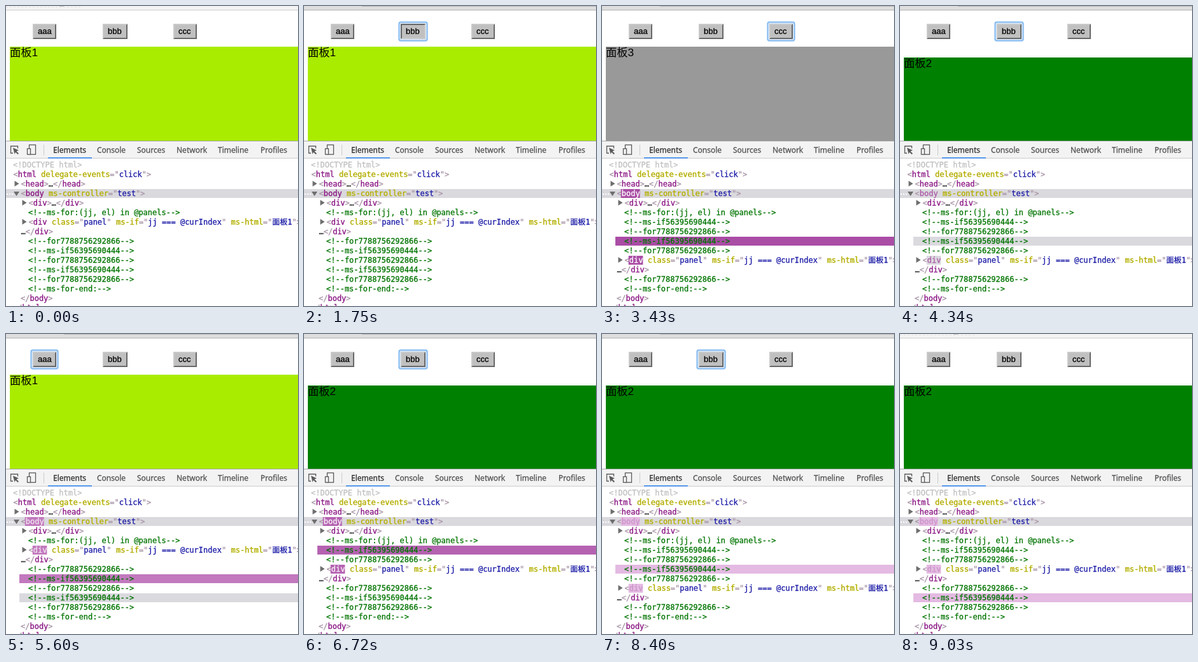
Write an HTML page with a canvas that moves like this. It is 459x472 px and loops after 9.1 s.

```html
<!DOCTYPE html>
<html lang="en">
<head>
<meta charset="utf-8">
<title>Panel switcher with element inspector</title>
<style>
  html, body { margin: 0; width: 100%; height: 100%; overflow: hidden; background: #fff; }
  canvas { display: block; }
</style>
</head>
<body>
<canvas id="stage" width="459" height="472"></canvas>
<script>
const ctx = document.getElementById('stage').getContext('2d');
const WIDTH = 459, LOOP = 9100, TICK = 70;

const MONO = '12px "DejaVu Sans Mono", monospace';
const UI = '12px "Noto Sans", "Open Sans", sans-serif';
const BUTTON_FONT = '13px "Liberation Sans", Arial, sans-serif';
const PANEL_FONT = '17.3px "Liberation Sans", "Noto Sans CJK SC", "Noto Sans CJK", sans-serif';
const GRAY = '#dad9de', PUNCT = '#a894a6', TAG = '#881280', VALUE = '#1a1aa6', COMMENT = '#007400';

const BUTTONS = [{ x: 42, w: 37, label: 'aaa' }, { x: 152, w: 39, label: 'bbb' }, { x: 263, w: 37, label: 'ccc' }];
const PANELS = [{ top: 64, color: '#aaec00' }, { top: 81, color: '#008000' }, { top: 64, color: '#999999' }];

// Each click: button pressed, then panel swapped, then the inspector catches up.
const PRESS = 140, LAG = 70;
const CLICKS = [
  { at: 1890, index: 1 }, { at: 3220, index: 2 }, { at: 4340, index: 1 }, { at: 5250, index: 0 },
  { at: 6440, index: 1 }, { at: 7770, index: 2 }, { at: 8400, index: 1 }
];
const WINDOW_FOCUS = 1050, WINDOW_BLUR = 8960;

function rect(x, y, w, h, color) {
  ctx.fillStyle = color;
  ctx.fillRect(x, y, w, h);
}

// A thin stroke of the same colour gives the heavier look of desktop font smoothing.
function text(str, x, y, color, font, weight = 0.3) {
  ctx.font = font;
  ctx.fillStyle = ctx.strokeStyle = color;
  ctx.fillText(str, x, y);
  if (weight) {
    ctx.lineWidth = weight;
    ctx.strokeText(str, x, y);
  }
  return x + ctx.measureText(str).width;
}

function polygon(points, color) {
  ctx.beginPath();
  points.forEach(([x, y]) => ctx.lineTo(x, y));
  ctx.closePath();
  ctx.fillStyle = color;
  ctx.fill();
}

function mix(from, to, k) {
  return `rgb(${from.map((v, i) => Math.round(v + (to[i] - v) * k)).join(',')})`;
}

// CSS "ease" curve
function ease(x) {
  const bezier = (t, a, b) => 3 * t * (1 - t) * ((1 - t) * a + t * b) + t ** 3;
  let lo = 0, hi = 1;
  for (let i = 0; i < 16; i++) {
    const mid = (lo + hi) / 2;
    if (bezier(mid, 0.25, 0.25) < x) lo = mid; else hi = mid;
  }
  return bezier(lo, 0.1, 1);
}

function flash(age) {
  if (!(age >= 0 && age < 1330)) return null;
  const k = ease(Math.min(age / 1120, 1));
  return {
    back: k > 0.87 ? GRAY : mix([158, 54, 153], [245, 219, 244], k),
    ink: mix([255, 255, 255], [136, 18, 128], k * k * 0.7)
  };
}

function stateAt(time) {
  const state = { focus: -1, pressed: -1, panel: 0, slot: 0, updated: -Infinity, closed: [] };
  for (const { at, index } of CLICKS) {
    if (time >= at - PRESS) {
      state.focus = index;
      state.pressed = time < at ? index : -1;
    }
    if (time >= at) state.panel = index;
    if (time >= at + LAG) {
      state.closed[state.slot] = at + LAG;
      state.slot = index;
      state.updated = at + LAG;
    }
  }
  state.active = time >= WINDOW_FOCUS && time < WINDOW_BLUR;
  if (!state.active) state.focus = -1;
  return state;
}

function drawWindowEdge(active) {
  rect(0, 0, WIDTH, 6, active ? '#dedede' : '#f3f3f3');
  if (active) {
    rect(91, 0, WIDTH - 91, 1, '#b8b8b8');
  } else {
    for (let x = 0; x < 120; x += 6) rect(x, 1, 3, 1, '#e2e2e2');
    rect(84, 0, 7, 1, '#c4c4c4');
  }
  rect(0, 6, WIDTH, 1, active ? '#b4b4b4' : '#cfcfcf');
}

function ring(x, y, w, h, outset, width, color) {
  ctx.beginPath();
  ctx.roundRect(x - outset, y - outset, w + 2 * outset, h + 2 * outset, outset);
  ctx.lineWidth = width;
  ctx.strokeStyle = color;
  ctx.stroke();
}

function drawButton({ x, w, label }, focused, pressed) {
  const y = 28, h = 24;
  if (focused) {
    ring(x, y, w, h, 3.5, 1.5, '#cfe4fa');
    ring(x, y, w, h, 2.3, 1.7, '#76b2ee');
    ring(x, y, w, h, 0.8, 1.4, '#d3e5f8');
  }
  const light = '#c9c9c9', dark = '#686868';
  rect(x, y, w, h, pressed ? dark : light);
  polygon([[x + w, y], [x + w, y + h], [x, y + h], [x + 2, y + h - 2], [x + w - 2, y + h - 2], [x + w - 2, y + 2]],
    pressed ? light : dark);
  rect(x + 2, y + 2, w - 4, h - 4, '#c0c0c0');
  text(label, x + 8, 44, '#000', BUTTON_FONT);
}

function drawPanel(index) {
  const { top, color } = PANELS[index];
  rect(6, top, WIDTH - 6, 212 - top, color);
  text('面板' + (index + 1), 6, top + 14.5, '#000', PANEL_FONT, 0);
}

function drawToolbar() {
  rect(0, 212, WIDTH, 260, '#fff');
  rect(0, 212, WIDTH, 28, '#f3f3f3');
  rect(0, 212, WIDTH, 1, '#a8a8a8');
  rect(0, 239, WIDTH, 1, '#cccccc');
  rect(59, 218, 1, 17, '#cccccc');
  rect(66, 238, 69, 2, '#5596ea');

  ctx.strokeStyle = '#5a5a5a';
  ctx.lineWidth = 1.3;
  ctx.beginPath();
  ctx.moveTo(11, 231.5);
  ctx.lineTo(7.5, 231.5);
  ctx.lineTo(7.5, 220.5);
  ctx.lineTo(18.5, 220.5);
  ctx.lineTo(18.5, 224);
  ctx.stroke();
  polygon([[11, 223], [20, 227], [16.5, 228.5], [20, 232], [18.5, 233.5], [15, 230], [13.5, 233]], '#5a5a5a');
  ctx.strokeRect(36.5, 218.5, 10, 15);
  rect(33, 224, 6, 10, '#f3f3f3');
  ctx.strokeRect(33.5, 224.5, 5, 9);

  const tabs = [['Elements', 74], ['Console', 143], ['Sources', 206], ['Network', 268], ['Timeline', 333], ['Profiles', 400]];
  tabs.forEach(([label, x], i) => text(label, x, 231, i ? '#555' : '#333', UI));
}

const rowY = row => 250 + 15 * row;

function code(row, x, parts) {
  for (const [str, color] of parts) x = text(str, x, rowY(row) + 4, color, MONO);
}

function attribute(name, value) {
  return [[' ', PUNCT], [name, 'attr'], ['="', PUNCT], [value, VALUE], ['"', PUNCT]];
}

function openTag(row, x, name, attributes, glow) {
  const y = rowY(row) + 4;
  x = text('<', x, y, PUNCT, MONO);
  if (glow) rect(x - 1, y - 11, name.length * 7.22 + 1, 14, glow.back);
  x = text(name, x, y, glow ? glow.ink : TAG, MONO);
  for (const [str, color] of [...attributes, ['>', PUNCT]]) {
    if (color === 'attr') {
      text(str, x + 0.4, y, '#bce000', MONO);
      x = text(str, x - 0.1, y, 'rgba(170,90,25,0.5)', MONO, 0) + 0.1;
    } else {
      x = text(str, x, y, color, MONO);
    }
  }
  return x;
}

function closeTag(row, x, name, lead = '') {
  code(row, x, [[lead, '#333'], ['</', PUNCT], [name, TAG], ['>', PUNCT]]);
}

function foldedTag(row, x, name) {
  const end = openTag(row, x, name, []);
  closeTag(row, end, name, '…');
  arrow(row, x - 11);
}

function arrow(row, x, open) {
  const y = rowY(row);
  polygon(open ? [[x - 1, y - 3], [x + 8, y - 3], [x + 3.5, y + 4]] : [[x + 1, y - 5], [x + 8, y - 0.5], [x + 1, y + 4]], '#6e6e6e');
}

function comment(row, str, glow) {
  if (glow) rect(21, rowY(row) - 7, WIDTH - 21, 14, glow.back);
  code(row, 35, [[`<!--${str}-->`, COMMENT]]);
}

function drawTree(state, time) {
  const glow = flash(time - state.updated);
  code(0, 11, [['<!DOCTYPE html>', '#c0c0c0']]);
  openTag(1, 11.5, 'html', attribute('delegate-events', 'click'));
  foldedTag(2, 23.5, 'head');

  rect(0, 288, WIDTH, 14, GRAY);
  for (let x = 1; x < 10; x += 4) rect(x, 295, 2, 2, '#fff');
  arrow(3, 13, true);
  openTag(3, 23.5, 'body', attribute('ms-controller', 'test'), glow);

  foldedTag(4, 35.5, 'div');
  comment(5, 'ms-for:(jj, el) in @panels');

  let row = 6;
  for (let slot = 0; slot < 3; slot++) {
    if (slot === state.slot) {
      arrow(row, 24.5);
      openTag(row++, 35.5, 'div', [
        ...attribute('class', 'panel'),
        ...attribute('ms-if', 'jj === @curIndex'),
        ...attribute('ms-html', '面板1')
      ], glow);
      closeTag(row++, 23.5, 'div', '…');
    } else {
      comment(row++, 'ms-if56395690444', flash(time - state.closed[slot]));
    }
    comment(row++, 'for7788756292866');
  }
  comment(row++, 'ms-for-end:');
  closeTag(row++, 23, 'body');
  closeTag(row, 11, 'html');
}

function draw(now) {
  const time = Math.floor((now % LOOP) / TICK) * TICK;
  const state = stateAt(time);
  rect(0, 0, WIDTH, 472, '#fff');
  drawWindowEdge(state.active);
  BUTTONS.forEach((button, i) => drawButton(button, i === state.focus, i === state.pressed));
  drawPanel(state.panel);
  drawToolbar();
  drawTree(state, time);
}

const start = performance.now();
function loop() {
  draw(performance.now() - start);
  requestAnimationFrame(loop);
}
loop();
</script>
</body>
</html>
```
